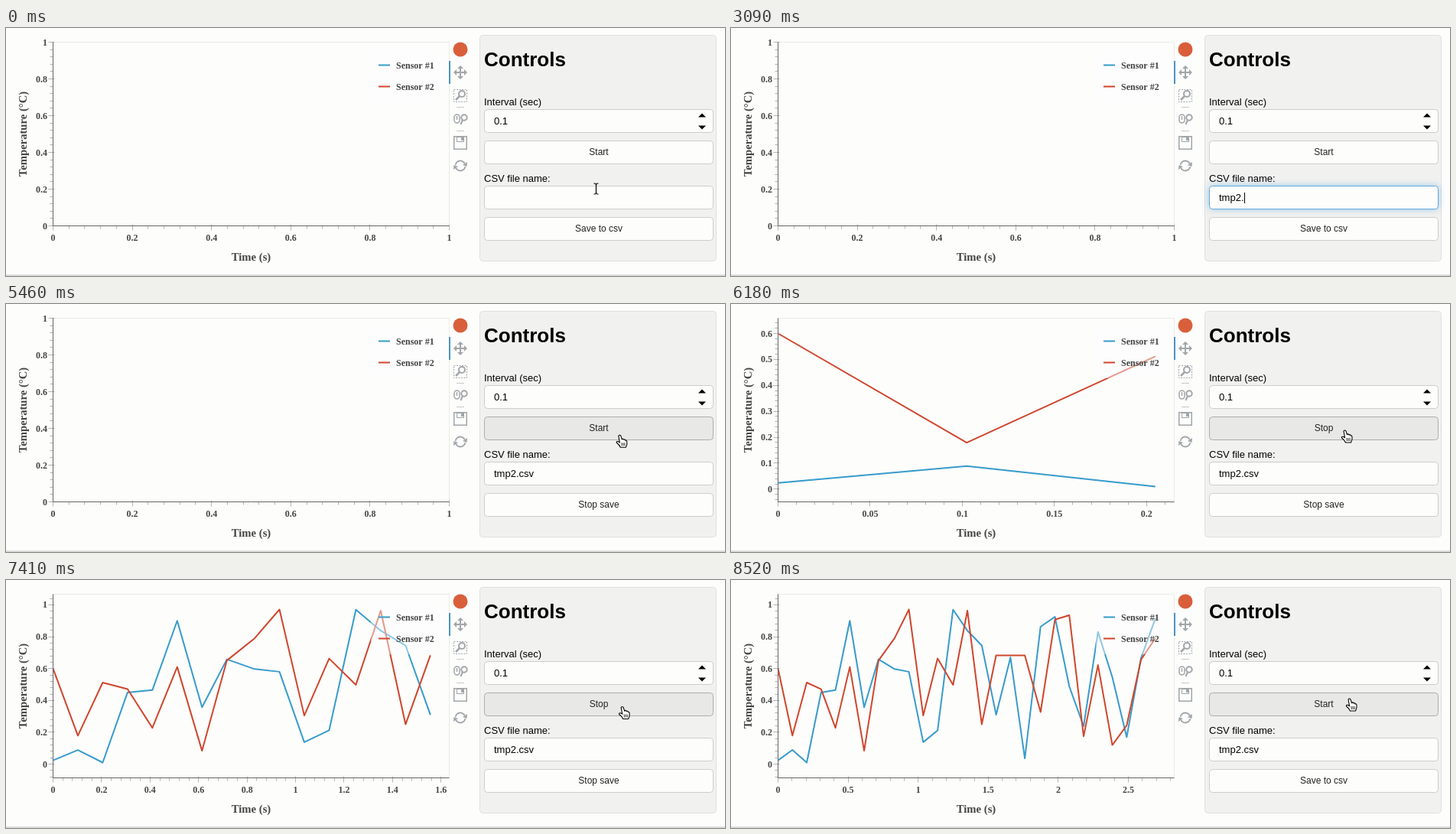
These frames come from a looping animation (940 px wide and 324 px high, 8550 ms). An HTML page with a canvas:

```html
<!DOCTYPE html>
<html lang="en">
<head>
<meta charset="utf-8">
<title>Sensor dashboard</title>
<style>
html, body { margin: 0; width: 940px; height: 324px; overflow: hidden; background: #fdfdfc; }
canvas { display: block; }
</style>
</head>
<body>
<canvas id="stage" width="940" height="324"></canvas>
<script>
const c = document.getElementById('stage').getContext('2d');
const LOOP = 8550;
const PAGE = '#fdfdfc', PANEL = '#f1f1ef', INK = '#444', ICON = '#a1a6a9';
const EDGE = '#cdcdcd', TICK = '#b4b4b4';
const BLUE = '#379bcb', RED = '#cf462c';
const SERIF = '"Liberation Serif", "Times New Roman", serif';
const SANS = '"Liberation Sans", Arial, sans-serif';
const plot = { l: 61.5, t: 18.5, r: 579.5, b: 258.5 };
const W = plot.r - plot.l, H = plot.b - plot.t;

const sensor1 = [.024, .089, .01, .45, .465, .9, .357, .658, .597, .58, .138, .212, .97, .838,
  .745, .31, .67, .036, .863, .925, .488, .238, .83, .546, .17, .666, .915];
const sensor2 = [.6, .179, .512, .471, .228, .61, .084, .651, .79, .971, .305, .663, .498, .964,
  .25, .683, .683, .683, .327, .907, .935, .175, .622, .12, .243, .656, .79];

// Moments of the session, in ms
const FOCUS = 900, SAVE = 4800, RUN = 5900, FIRST = 5930, STEP = 97, HALT = 8480;
const keys = [1700, 1950, 2200, 2600, 2900, 3250, 3450, 3650];
const NAME = 'tmp2.csv';

// Pointer stops: time, x, y
const path = [[0, 771, 210], [3850, 771, 210], [4400, 802, 279], [4950, 802, 279], [5550, 805, 173],
  [7100, 805, 173], [7700, 811, 174], [8100, 811, 174], [8400, 811, 163], [LOOP, 811, 163]];

const sampleTime = k => .1024 * k + (k > 7 ? .012 : 0) + (k > 11 ? .008 : 0) + (k > 17 ? .01 : 0);

function text(s, x, y, font, color, align = 'left') {
  c.font = font;
  c.fillStyle = color;
  c.textAlign = align;
  c.fillText(s, x, y);
}

function stroke(points, color, width = 1) {
  c.strokeStyle = color;
  c.lineWidth = width;
  c.beginPath();
  points.forEach(p => c.lineTo(p[0], p[1]));
  c.stroke();
}

function shape(points, fill, edge) {
  c.beginPath();
  points.forEach(p => c.lineTo(p[0], p[1]));
  c.closePath();
  c.fillStyle = fill;
  c.fill();
  if (edge) {
    c.strokeStyle = edge;
    c.lineWidth = 1;
    c.stroke();
  }
}

function box(x, y, w, h, fill, edge) {
  c.beginPath();
  c.roundRect(x, y, w, h, 4);
  c.fillStyle = fill;
  c.fill();
  c.shadowBlur = 0;
  c.strokeStyle = edge;
  c.lineWidth = 1;
  c.stroke();
}

function ring(x, y, r, color, width, from = 0, to = Math.PI * 2) {
  c.strokeStyle = color;
  c.lineWidth = width;
  c.beginPath();
  c.arc(x, y, r, from, to);
  c.stroke();
}

// Tick spacing 1, 2 or 5 times a power of ten, nearest to six ticks
function spacing(span) {
  const mag = 10 ** Math.floor(Math.log10(span / 6));
  const miss = s => Math.abs(6 - span / s);
  return [1, 2, 5, 10].map(m => m * mag).reduce((a, b) => miss(b) < miss(a) ? b : a);
}

function eachTick(lo, hi, draw) {
  const minor = spacing(hi - lo) / 5;
  for (let i = Math.ceil(lo / minor - 1e-6); i <= hi / minor + 1e-6; i++) {
    draw(i * minor, i % 5 === 0);
  }
}

function drawPlot(t) {
  const last = Math.min(26, Math.floor((t - FIRST) / STEP));
  let hiX = 1, loY = 0, hiY = 1;
  if (last >= 0) {
    const all = [...sensor1.slice(0, last + 1), ...sensor2.slice(0, last + 1)];
    const lo = Math.min(...all), hi = Math.max(...all), pad = (hi - lo) * .1;
    loY = lo - pad;
    hiY = hi + pad;
    if (last > 0) hiX = sampleTime(last) * 1.05;
  }
  const px = v => plot.l + v / hiX * W;
  const py = v => plot.b - (v - loY) / (hiY - loY) * H;
  const label = v => String(Math.abs(v) < 1e-9 ? 0 : +v.toFixed(3));

  c.strokeStyle = '#ebebe2';
  c.lineWidth = 1;
  c.strokeRect(plot.l, plot.t, W, H);

  c.lineJoin = 'round';
  if (last > 0) {
    [[sensor1, BLUE], [sensor2, RED]].forEach(([data, color]) =>
      stroke(data.slice(0, last + 1).map((v, k) => [px(sampleTime(k)), py(v)]), color, 2));
  }
  c.lineJoin = 'miter';

  const small = 'bold 12px ' + SERIF;
  eachTick(0, hiX, (v, major) => {
    const x = Math.round(px(v) - .5) + .5;
    stroke([[x, plot.b - (major ? 2 : 0)], [x, plot.b + (major ? 6 : 4)]], TICK);
    if (major) text(label(v), px(v), 278, small, INK, 'center');
  });
  eachTick(loY, hiY, (v, major) => {
    const y = Math.round(py(v) - .5) + .5;
    stroke([[plot.l + (major ? 2 : 0), y], [plot.l - (major ? 6 : 4), y]], TICK);
    if (major) text(label(v), 54, py(v) + 4, small, INK, 'right');
  });
  stroke([[plot.l, plot.t], [plot.l, plot.b], [plot.r, plot.b]], '#666');

  const big = 'bold 14.67px ' + SERIF;
  text('Time (s)', 320.5, 304, big, INK, 'center');
  c.save();
  c.translate(27, 138.5);
  c.rotate(-Math.PI / 2);
  text('Temperature (°C)', 0, 0, big, INK, 'center');
  c.restore();

  c.fillStyle = 'rgba(253,253,252,.45)';
  c.fillRect(477, 28, 93, 69);
  [['Sensor #1', BLUE, 48.5], ['Sensor #2', RED, 76.5]].forEach(([name, color, y]) => {
    stroke([[487, y], [502, y]], color, 2);
    text(name, 510, y + 4.5, small, INK);
  });
}

function drawTools() {
  c.fillStyle = '#d95f3b';
  c.beginPath();
  c.arc(594, 28, 9.5, 0, Math.PI * 2);
  c.fill();
  c.fillStyle = '#4b94c4';
  c.fillRect(579, 43, 2, 30);

  // Pan
  stroke([[586, 58], [602, 58]], ICON, 2);
  stroke([[594, 50], [594, 66]], ICON, 2);
  for (let i = 0; i < 4; i++) {
    c.save();
    c.translate(594, 58);
    c.rotate(i * Math.PI / 2);
    shape([[0, -9], [4, -5], [-4, -5]], ICON);
    c.restore();
  }

  // Box zoom
  c.setLineDash([2, 1.5]);
  c.strokeStyle = ICON;
  c.lineWidth = 1;
  c.strokeRect(585.5, 80.5, 17, 16);
  c.setLineDash([]);
  ring(596, 86, 4, ICON, 2);
  stroke([[593, 89], [588, 94]], ICON, 2.5);

  // Wheel zoom
  c.strokeStyle = ICON;
  c.lineWidth = 1.5;
  c.beginPath();
  c.roundRect(586, 113, 7, 11, 3.5);
  c.stroke();
  stroke([[589.5, 115], [589.5, 120]], ICON, 1.5);
  ring(599, 117, 3.7, ICON, 2);
  stroke([[597, 120], [594.5, 126]], ICON, 2);

  stroke([[589, 103.5], [599, 103.5]], '#c8c8c8');
  stroke([[589, 134.5], [599, 134.5]], '#c8c8c8');

  // Save
  c.strokeStyle = ICON;
  c.lineWidth = 1.5;
  c.strokeRect(585.75, 141.75, 16.5, 16.5);
  c.lineWidth = 1;
  c.strokeRect(589.5, 142.5, 9, 6);
  c.fillStyle = ICON;
  c.fillRect(595, 143, 3, 4);

  // Reset
  ring(594, 180, 6.5, ICON, 1.8, Math.PI * 1.05, Math.PI * 1.85);
  ring(594, 180, 6.5, ICON, 1.8, Math.PI * .05, Math.PI * .85);
  shape([[603, 175], [602.5, 181], [597, 179]], ICON);
  shape([[585, 185], [585.5, 179], [591, 181]], ICON);
}

function button(label, y, hover) {
  box(625.5, y + .5, 299, 30, hover ? '#e8e8e6' : PAGE, hover ? '#adadad' : EDGE);
  text(label, 775, y + 19, '12px ' + SANS, '#222', 'center');
}

function drawPanel(t, mouse) {
  const font = '13px ' + SANS;
  const over = y => mouse.shown && mouse.y - 7 > y && mouse.y - 7 < y + 31;
  const running = t >= RUN && t < HALT;
  const saving = t >= SAVE && t < HALT;
  const focused = t >= FOCUS && t < SAVE;

  box(619.5, 9.5, 309, 295, PANEL, '#e0e0e0');
  text('Controls', 625, 50, 'bold 26px ' + SANS, '#000');
  text('Interval (sec)', 625, 101, font, '#000');
  box(625.5, 106.5, 299, 30, PAGE, EDGE);
  text('0.1', 638, 126, font, '#000');
  shape([[905, 116.5], [910, 111.5], [915, 116.5]], '#000');
  shape([[905, 127.5], [910, 132.5], [915, 127.5]], '#000');
  button(running ? 'Stop' : 'Start', 147, over(147));

  text('CSV file name:', 625, 201, font, '#000');
  if (focused) {
    c.shadowColor = 'rgba(102,175,233,.7)';
    c.shadowBlur = 8;
  }
  box(625.5, 206.5, 299, 30, PAGE, focused ? '#66a9dc' : EDGE);
  const typed = NAME.slice(0, keys.filter(k => k <= t).length);
  text(typed, 638, 226, font, '#000');
  const key = keys.filter(k => k <= t).pop() || FOCUS;
  if (focused && (t - key) % 1000 < 500) {
    c.fillStyle = '#000';
    c.fillRect(Math.round(638 + c.measureText(typed).width), 215, 1, 14);
  }
  button(saving ? 'Stop save' : 'Save to csv', 247, over(247));
}

function pointer(t) {
  const i = Math.max(1, path.findIndex(p => p[0] > t));
  const [t0, x0, y0] = path[i - 1], [t1, x1, y1] = path[i];
  const u = (t - t0) / (t1 - t0), e = u * u * (3 - 2 * u);
  return { x: x0 + (x1 - x0) * e, y: y0 + (y1 - y0) * e, shown: t < keys[0] || t > 3850 };
}

function drawHand() {
  c.beginPath();
  c.moveTo(-4, -7);
  c.quadraticCurveTo(-2.5, -9, -1, -7);
  c.lineTo(.5, -2.5);
  c.quadraticCurveTo(2, -4, 3, -2);
  c.quadraticCurveTo(4.5, -3, 5.2, -1);
  c.quadraticCurveTo(7, -1.5, 7, 1);
  c.quadraticCurveTo(7.5, 4, 5.5, 8);
  c.lineTo(-1.5, 8);
  c.quadraticCurveTo(-3, 4.5, -6.5, 2);
  c.quadraticCurveTo(-7, -.5, -4.5, .5);
  c.lineTo(-2.5, 1.5);
  c.closePath();
  c.fillStyle = '#fff';
  c.fill();
  c.strokeStyle = '#000';
  c.lineWidth = 1.1;
  c.stroke();
  [0, 2, 4].forEach(x => stroke([[x, 2], [x + .3, 6]], '#000', .8));
}

function drawBeam() {
  stroke([[.5, -6], [.5, 6]], '#000', 1.2);
  [-1, 1].forEach(s => {
    stroke([[-2.5, 7 * s], [-.5, 6.8 * s], [.5, 5.5 * s], [1.5, 6.8 * s], [3.5, 7 * s]], '#000', 1.2);
  });
}

function drawPointer(m) {
  if (!m.shown) return;
  const tip = m.y - 7;
  c.save();
  c.translate(m.x, m.y);
  if ((tip > 247 && tip < 278) || (tip > 147 && tip < 178)) drawHand();
  else if (tip > 200 && tip < 237) drawBeam();
  else shape([[-4, -8], [-4, 6], [-1, 3.5], [1, 8], [3, 7], [1, 2.5], [5, 2]], '#000', '#fff');
  c.restore();
}

function frame(now) {
  const t = now % LOOP;
  const mouse = pointer(t);
  c.fillStyle = PAGE;
  c.fillRect(0, 0, 940, 324);
  stroke([[0, 323], [940, 323]], '#bababa');
  drawPlot(t);
  drawTools();
  drawPanel(t, mouse);
  drawPointer(mouse);
  requestAnimationFrame(frame);
}
requestAnimationFrame(frame);
</script>
</body>
</html>
```
